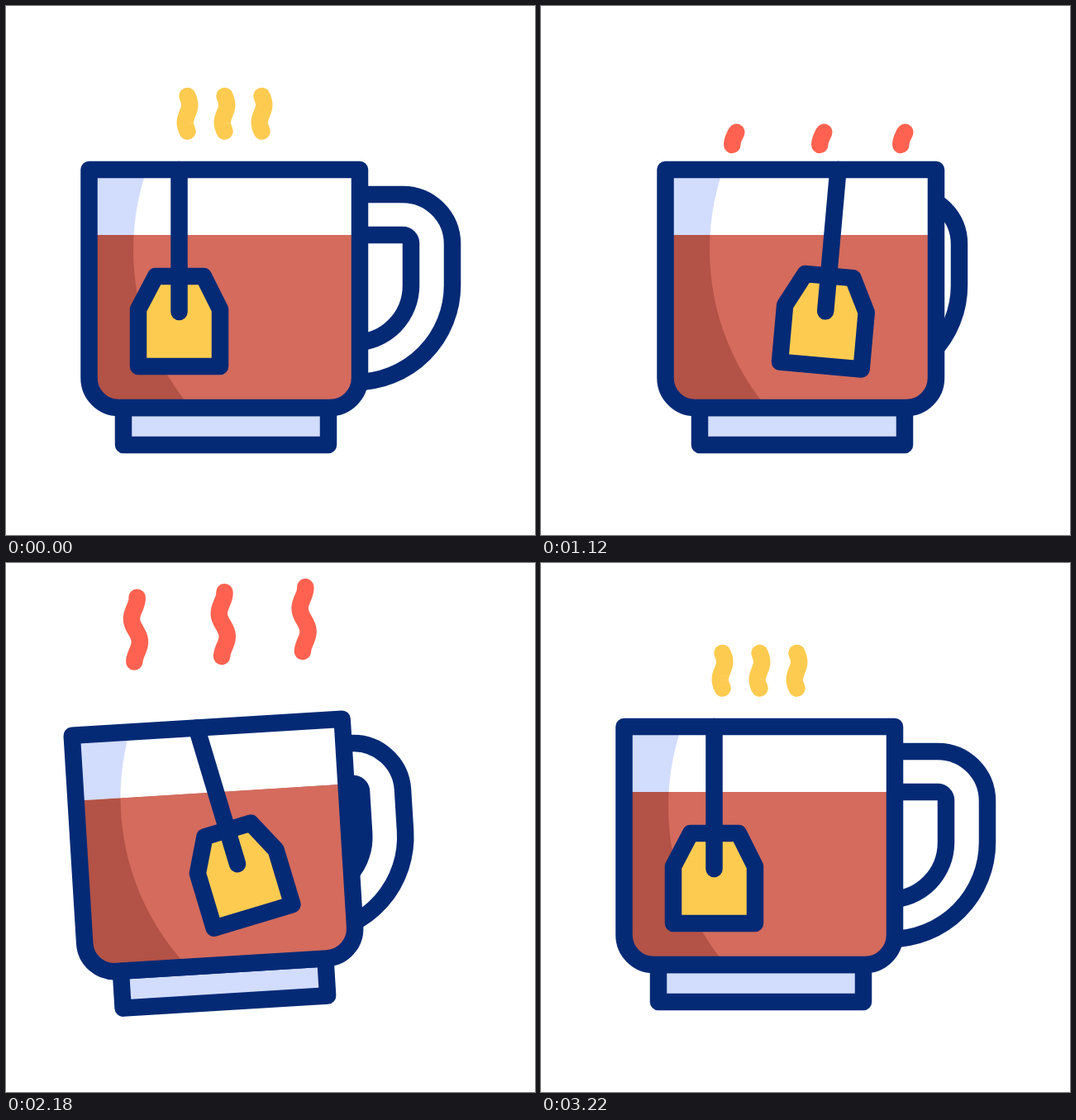
An HTML page with a canvas that plays this animation: 640 by 640 pixels, repeating every 3600 ms.

```html
<!DOCTYPE html>
<html lang="en">
<head>
<meta charset="utf-8">
<title>Cup of tea</title>
<style>
html, body { margin: 0; width: 100%; height: 100%; overflow: hidden; background: #fff; }
canvas { display: block; width: 100vw; height: 100vh; }
</style>
</head>
<body>
<canvas id="stage" width="640" height="640"></canvas>
<script>
const ctx = document.getElementById('stage').getContext('2d');
const LOOP = 3600;
const NAVY = '#042a76', YELLOW = '#fdcb50', RED = '#ff6250';
const PALE = '#d2dcfd', TEA = '#d46b5d', DARK_TEA = '#b35246';

// Main beats: the twist out and the twist back
const A = [0, 293, 586, 880], B = [1783, 2103, 2423, 2743];
const beats = [...A, ...B];
const keys = values => beats.map((t, i) => [t, values[i]]);

const tracks = {
  slide: [[A[0], 0], [A[1], 50], [B[0], 50], [B[1], 0]],
  tilt: keys([0, 5, -5, 0, 0, -5, 4.9, 0]),
  handle: keys([0, -84, -37, -84, -84, -37, -84, 0]),
  bag: keys([0, 100, 32, 100, 100, 32, 100, 0]),
  swing: [[A[0], 0], [A[1], 17], [A[2], -17], [A[3], 24], [1310, -8], [B[0], 0],
          [B[1], -18.5], [B[2], 17], [B[3], -10], [3000, 4], [3220, 0]]
};

function ease(t, from, to) {
  const u = Math.min(1, Math.max(0, (t - from) / (to - from)));
  return u * u * (3 - 2 * u);
}

function at(track, t) {
  let v = track[0][1];
  for (let i = 1; i < track.length; i++) {
    const [t0, v0] = track[i - 1], [t1, v1] = track[i];
    if (t >= t0) v = v0 + (v1 - v0) * ease(t, t0, t1);
  }
  return v;
}

function stroke(color) {
  ctx.strokeStyle = color;
  ctx.stroke();
}

function turn(x, y, deg) {
  ctx.translate(x, y);
  ctx.rotate(deg * Math.PI / 180);
  ctx.translate(-x, -y);
}

// Strokes the part of a curve between two fractions of its parameter
function trim(point, from, to, color) {
  if (to - from < 0.004) return;
  ctx.beginPath();
  const n = 60;
  for (let i = 0; i <= n; i++) ctx.lineTo(...point(from + (to - from) * i / n));
  stroke(color);
}

function drawHandle(dx) {
  ctx.save();
  ctx.translate(dx, 0);
  ctx.beginPath();
  ctx.moveTo(420, 228);
  ctx.lineTo(480, 228);
  ctx.arc(480, 288, 60, -Math.PI / 2, 0);
  ctx.lineTo(540, 338);
  ctx.arc(423, 338, 117, 0, Math.PI / 2);
  ctx.moveTo(420, 277);
  ctx.lineTo(480, 277);
  ctx.arcTo(490, 277, 490, 287, 10);
  ctx.lineTo(490, 338);
  ctx.ellipse(422, 338, 68, 69, 0, 0, Math.PI / 2);
  stroke(NAVY);
  ctx.restore();
}

function bodyPath() {
  ctx.beginPath();
  ctx.moveTo(100.5, 198);
  ctx.lineTo(428, 198);
  ctx.arcTo(428, 486, 390, 486, 36);
  ctx.arcTo(100.5, 486, 100.5, 450, 36);
  ctx.closePath();
}

function fillBands(top, bottom) {
  ctx.fillStyle = top;
  ctx.fillRect(90, 188, 350, 89);
  ctx.fillStyle = bottom;
  ctx.fillRect(90, 277, 350, 220);
}

function drawBase() {
  ctx.beginPath();
  ctx.rect(142, 486, 248, 45);
  ctx.fillStyle = PALE;
  ctx.fill();
  stroke(NAVY);
}

function drawGlass() {
  ctx.save();
  bodyPath();
  ctx.clip();
  fillBands(PALE, DARK_TEA);
  ctx.beginPath();
  ctx.arc(452, 295, 298, 0, Math.PI * 2);
  ctx.clip();
  fillBands('#fff', TEA);
  ctx.restore();
}

function drawBag(dx, deg) {
  ctx.save();
  ctx.translate(dx, 0);
  turn(209.5, 198, deg);
  ctx.beginPath();
  for (const [x, y] of [[160, 436], [160, 367], [181, 327], [239, 327], [259, 367], [259, 436]])
    ctx.lineTo(x, y);
  ctx.closePath();
  ctx.fillStyle = YELLOW;
  ctx.fill();
  stroke(NAVY);
  ctx.beginPath();
  ctx.moveTo(209.5, 198);
  ctx.lineTo(209.5, 370);
  stroke(NAVY);
  ctx.restore();
}

function drawSteam(t) {
  const gone = t < 1500 ? ease(t, A[0], A[2]) : 0;
  const grown = t < 1500 ? 1 : ease(t, 2725, 3230);
  for (const x of [219.5, 264.5, 309.5])
    trim(u => [x - 2.7 * Math.sin(u * 2 * Math.PI), 151.5 - 42.5 * u], gone, grown, YELLOW);

  const head = ease(t, 945, 1778), tail = ease(t, 1786, 2680);
  for (const x of [185.4, 291.4, 389.4])
    trim(u => [x - 4.1 * Math.cos(u * 5 * Math.PI), 168 - 132 * u], tail, head, RED);
}

function drawSwoosh(t) {
  if (t > 700) return;
  const head = ease(t, 60, 330), tail = ease(t, 310, A[2]);
  const arc = (x0, x1, mid, low, k) => trim(u => {
    const x = x0 + (x1 - x0) * u;
    return [x, low - k * (x - mid) ** 2];
  }, tail, head, YELLOW);
  arc(43, 297, 300, 389, 0.00086);
  arc(78, 321, 288, 441, 0.00092);
}

function draw(t) {
  ctx.fillStyle = '#fff';
  ctx.fillRect(0, 0, 640, 640);
  ctx.lineWidth = 20.5;
  ctx.lineCap = ctx.lineJoin = 'round';

  ctx.save();
  ctx.translate(at(tracks.slide, t), 0);
  turn(266, 541, at(tracks.tilt, t));
  drawHandle(at(tracks.handle, t));
  drawBase();
  drawGlass();
  drawBag(at(tracks.bag, t), at(tracks.swing, t));
  bodyPath();
  stroke(NAVY);
  drawSteam(t);
  ctx.restore();

  drawSwoosh(t);
}

const start = performance.now();
function tick() {
  draw((performance.now() - start) % LOOP);
  requestAnimationFrame(tick);
}
tick();
</script>
</body>
</html>
```
